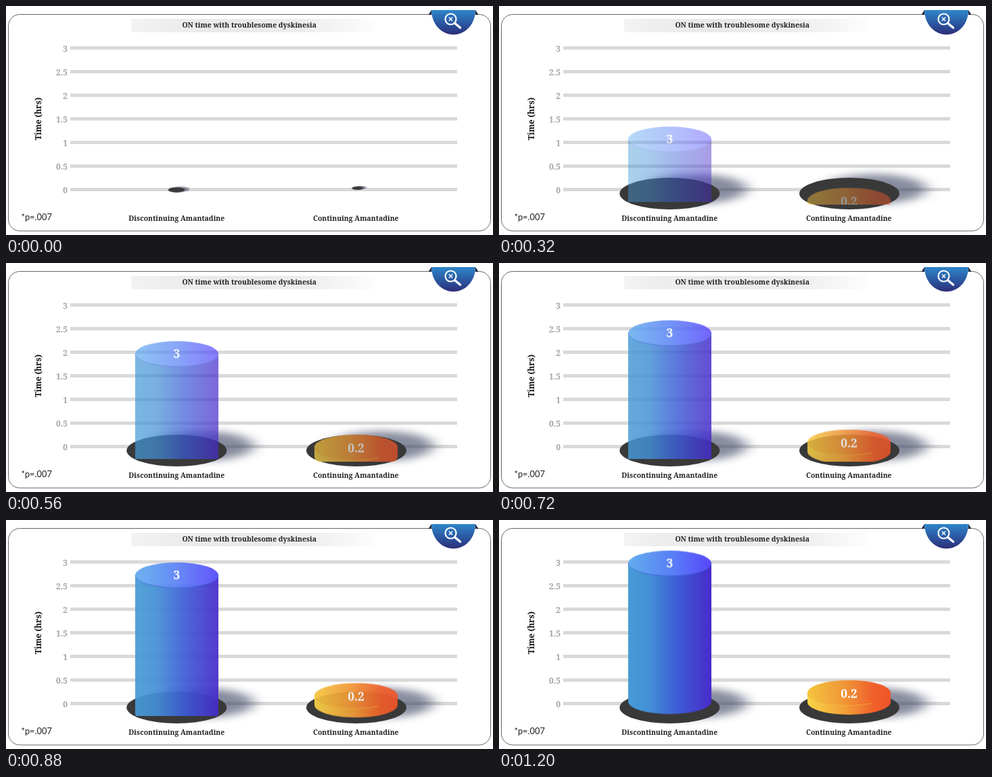
Recreate the animation shown at these times as an HTML page. Size 720 by 340 pixels, loop 8 s.

```html
<!DOCTYPE html>
<html lang="en">
<head>
<meta charset="utf-8">
<title>ON time with troublesome dyskinesia</title>
<style>
  html, body { margin: 0; width: 100%; height: 100%; overflow: hidden; background: #fff; }
  svg { display: block; width: 720px; height: 340px; }
  text { font: bold 10.45px "Noto Serif", serif; fill: #222; text-anchor: middle; }
  .ticks text { font-size: 12px; fill: #a3a3a3; text-anchor: end; }
  .axis { font-size: 12px; fill: #111; }
  .note { font: 12.8px Lato, sans-serif; text-anchor: start; }
  .value { font-size: 17.5px; fill: #fff; }

  /* The bezier is an exact quadratic ease-out. */
  .bar, .base {
    animation: rise 8s cubic-bezier(.3333, .6667, .6667, 1) infinite;
  }
  .base { animation-name: grow; }
  @keyframes rise {
    0% { transform: translateY(var(--drop)); opacity: 0; }
    15%, 100% { transform: translateY(0); opacity: 1; }
  }
  @keyframes grow {
    0% { transform: scale(var(--start)); }
    3.9%, 100% { transform: scale(1); }
  }
  .blue .bar { --drop: 249px; }
  .orange .bar { --drop: 60px; }
  .blue .base { --start: .16; transform-origin: 252px 272px; }
  .orange .base { --start: .108; transform-origin: 520px 269.5px; }
</style>
</head>
<body>
<svg viewBox="0 0 720 340">
  <defs>
    <linearGradient id="band">
      <stop offset="0" stop-color="#f3f3f3"/>
      <stop offset=".14" stop-color="#eee"/>
      <stop offset=".35" stop-color="#e9e9e9"/>
      <stop offset=".7" stop-color="#ededed"/>
      <stop offset="1" stop-color="#fdfdfd"/>
    </linearGradient>
    <linearGradient id="ribbon" x2="0" y2="1">
      <stop offset="0" stop-color="#2f86c9"/>
      <stop offset=".55" stop-color="#2b56a0"/>
      <stop offset="1" stop-color="#2d2d78"/>
    </linearGradient>
    <linearGradient id="blueSide">
      <stop offset="0" stop-color="#479bd6"/>
      <stop offset=".25" stop-color="#4490d6"/>
      <stop offset=".6" stop-color="#3d5cd6"/>
      <stop offset="1" stop-color="#482bcb"/>
    </linearGradient>
    <linearGradient id="blueTop">
      <stop offset="0" stop-color="#62adee"/>
      <stop offset=".5" stop-color="#5a82f6"/>
      <stop offset="1" stop-color="#5747fc"/>
    </linearGradient>
    <linearGradient id="orangeSide">
      <stop offset="0" stop-color="#f9d548"/>
      <stop offset=".45" stop-color="#f2a038"/>
      <stop offset=".8" stop-color="#f0602a"/>
      <stop offset="1" stop-color="#ef5429"/>
    </linearGradient>
    <linearGradient id="orangeTop">
      <stop offset="0" stop-color="#f5c63f"/>
      <stop offset=".45" stop-color="#f09537"/>
      <stop offset=".8" stop-color="#f05f2b"/>
      <stop offset="1" stop-color="#f0562b"/>
    </linearGradient>
    <filter id="soft" x="-30%" y="-60%" width="160%" height="220%">
      <feGaussianBlur stdDeviation="11 6"/>
    </filter>
    <clipPath id="blueClip"><path d="M180 0h150v290.5h-150z"/></clipPath>
    <clipPath id="orangeClip"><path d="M440 0h150v295h-150z"/></clipPath>
    <g id="disc">
      <ellipse cx="38" cy="-7" rx="76" ry="22" fill="#3d4462" opacity=".62" filter="url(#soft)"/>
      <ellipse rx="74" ry="23.5" fill="#393939"/>
    </g>
  </defs>

  <rect x="3.5" y="12.5" width="713" height="321.5" rx="17" fill="#fff" stroke="#666"/>
  <rect x="185" y="19" width="361" height="20" fill="url(#band)"/>
  <text x="359.7" y="32">ON time with troublesome dyskinesia</text>

  <path d="M95 62.3h572M95 97.4h572M95 132.4h572M95 167.4h572M95 202.6h572M95 237.7h572M95 272.6h572"
        stroke="#d9d9d9" stroke-width="5"/>
  <g class="ticks">
    <text x="91" y="67.5">3</text>
    <text x="91" y="102.5">2.5</text>
    <text x="91" y="137.5">2</text>
    <text x="91" y="172.5">1.5</text>
    <text x="91" y="207.7">1</text>
    <text x="91" y="242.8">0.5</text>
    <text x="91" y="277.7">0</text>
  </g>
  <text class="axis" transform="translate(52 167.5) rotate(-90)">Time (hrs)</text>

  <path d="M624.5 13l4.5-7v7zM698.5 13l-4.5-7v7z" fill="#1c2740"/>
  <path d="M629 6h65c0 20-14 36.5-32.5 36.5S629 26 629 6z" fill="url(#ribbon)"/>
  <g fill="none" stroke="#fff" stroke-linecap="round">
    <circle cx="657.5" cy="19.5" r="8" stroke-width="2.2"/>
    <path d="M655.3 17.3l4.4 4.4m0-4.4l-4.4 4.4" stroke-width="1.5"/>
    <path d="M664 26l7.5 6.3" stroke-width="3.4"/>
  </g>

  <g class="blue">
    <g class="base"><use href="#disc" x="252.3" y="278.5"/></g>
    <g clip-path="url(#blueClip)">
      <g class="bar">
        <path d="M191 64v205.5a61.5 18.7 0 0 0 123 0V64z" fill="url(#blueSide)"/>
        <ellipse cx="252.5" cy="64.2" rx="61.5" ry="18.7" fill="url(#blueTop)"/>
        <path d="M191 64.2a61.5 18.7 0 0 0 123 0" fill="none" stroke="#3c62d6" stroke-width=".8"/>
        <text class="value" x="252.5" y="70.5">3</text>
      </g>
    </g>
  </g>

  <g class="orange">
    <g class="base"><use href="#disc" x="518" y="278.5"/></g>
    <g clip-path="url(#orangeClip)">
      <g class="bar">
        <path d="M456 256.5v13.8a61.5 18.7 0 0 0 123 0v-13.8z" fill="url(#orangeSide)"/>
        <ellipse cx="517.5" cy="256.5" rx="61.5" ry="18.7" fill="url(#orangeTop)"/>
        <path d="M456 256.5a61.5 18.7 0 0 0 95 15.7" fill="none" stroke="#f5b03a" stroke-width=".8"/>
        <text class="value" x="517.5" y="263.8">0.2</text>
      </g>
    </g>
  </g>

  <text x="252.3" y="318.5">Discontinuing Amantadine</text>
  <text x="517.3" y="318.5">Continuing Amantadine</text>
  <text class="note" x="22.5" y="318">*p=.007</text>
</svg>
</body>
</html>
```
